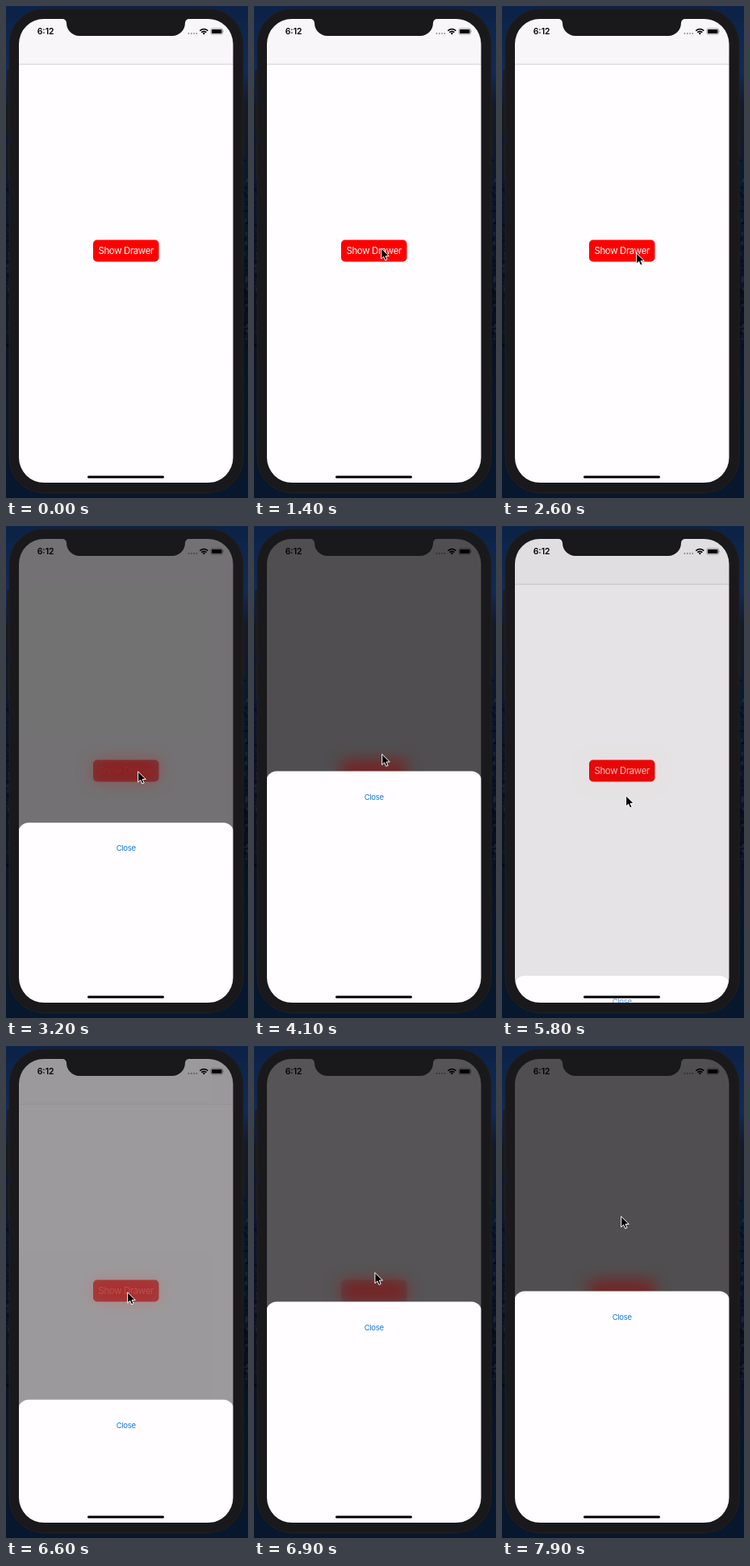
Recreate the animation shown at these times as an HTML page. Size 300 by 609 pixels, loop 8000 ms.

```html
<!DOCTYPE html>
<html lang="en">
<head>
<meta charset="utf-8">
<title>Drawer</title>
<style>
  html, body { margin: 0; width: 100%; height: 100%; overflow: hidden; background: #0b1c36; }
  svg { display: block; width: 300px; height: 609px; }
  text { font-family: Inter, "Open Sans", sans-serif; }
  .label { text-anchor: middle; }
</style>
</head>
<body>
<svg viewBox="0 0 300 609">
  <defs>
    <linearGradient id="sky" x2="0" y2="1">
      <stop offset="0" stop-color="#0c2246"/>
      <stop offset=".13" stop-color="#102a58"/>
      <stop offset=".2" stop-color="#141a28"/>
      <stop offset=".36" stop-color="#0b1830"/>
      <stop offset=".62" stop-color="#0a1120"/>
      <stop offset="1" stop-color="#07182e"/>
    </linearGradient>
    <filter id="soft" x="-50%" y="-150%" width="200%" height="400%" color-interpolation-filters="sRGB">
      <feGaussianBlur stdDeviation="9"/>
    </filter>
    <clipPath id="screen"><rect x="15" y="15" width="267.500" height="576" rx="12"/></clipPath>
  </defs>

  <rect width="300" height="609" fill="url(#sky)"/>
  <g id="rocks"></g>
  <g fill="#1b1a1c">
    <rect x="1.500" y="79" width="5" height="24" rx="1"/>
    <rect x="1.500" y="121" width="5" height="37" rx="1"/>
    <rect x="1.500" y="170" width="5" height="37" rx="1"/>
    <rect x="291" y="121" width="5" height="64" rx="1"/>
  </g>

  <g clip-path="url(#screen)">
    <rect width="300" height="609" fill="#fffdff"/>
    <g class="detail">
      <rect width="300" height="72" fill="#f8f6f9"/>
      <rect y="71.700" width="300" height=".8" fill="#c6c4c8"/>
    </g>
    <g id="button">
      <rect x="108" y="289.500" width="81.500" height="27" rx="5" fill="#f00"/>
      <text class="label detail" x="148.700" y="307.200" font-size="11.500" letter-spacing="-.4" fill="#fff">Show Drawer</text>
    </g>
    <g id="shade">
      <rect width="300" height="609" fill="#504e50"/>
      <rect x="108" y="289.500" width="81.500" height="27" rx="5" fill="#722526" filter="url(#soft)"/>
    </g>
    <g id="drawer">
      <rect x="15" width="267.500" height="320" rx="13" fill="#fffdff"/>
      <text id="close" class="label" x="148.700" y="35.300" font-size="9.600" letter-spacing="-.35" fill="#1478e0">Close</text>
    </g>
    <rect x="101" y="581.500" width="95" height="3" rx="1.500" fill="#000"/>
    <text x="38.700" y="35.200" font-size="10.400" font-weight="600" fill="#000">6:12</text>
    <path d="M226.500 34H238" stroke="#000" opacity=".42" stroke-width="1.800" stroke-linecap="round" stroke-dasharray="0 3.300"/>
    <g fill="none" stroke="#000" stroke-width="1.600">
      <path d="M240.300 30.700Q245.300 26.300 250.300 30.700M242.200 32.700Q245.300 30.100 248.400 32.700"/>
      <path d="M243.600 33.600L245.300 35.400L247 33.600Q245.300 32.400 243.600 33.600Z" fill="#000" stroke="none"/>
    </g>
    <rect x="253.900" y="27.900" width="14.700" height="7.200" rx="2" fill="none" stroke="#000" stroke-opacity=".5" stroke-width=".7"/>
    <rect x="255" y="29" width="12.500" height="5" rx="1" fill="#000"/>
    <path d="M269.500 30.300Q270.800 31.500 269.500 32.700Z" fill="#000" opacity=".5"/>
  </g>

  <!-- Bezel ring with the screen and notch cut out -->
  <path fill="#19181a" fill-rule="evenodd" d="
    M47 3.500H251A43 43 0 0 1 294 46.500V559.500A43 43 0 0 1 251 602.500H47A43 43 0 0 1 4 559.500V46.500A43 43 0 0 1 47 3.500Z
    M47 16H70A5 5 0 0 1 75 21A16 16 0 0 0 91 37H206A16 16 0 0 0 222 21A5 5 0 0 1 227 16H250.500
    A31 31 0 0 1 281.500 47V559A31 31 0 0 1 250.500 590H47A31 31 0 0 1 16 559V47A31 31 0 0 1 47 16Z"/>
  <rect x="4" y="3.500" width="290" height="599" rx="43" fill="none" stroke="#222123"/>

  <path id="cursor" d="M0 0V13.200L3 10.400L5 15L7.400 14L5.400 9.600H9.600Z" fill="#000" stroke="#fff" stroke-linejoin="round"/>
</svg>
<script>
  const LOOP = 8000, STEP = 100, OPEN_TOP = 303.5, CLOSED_TOP = 590, MOVE = 600;
  const el = id => document.getElementById(id);
  const fade = (node, value) => node.setAttribute("opacity", value);

  // Seeded speckle for the rocky wallpaper on both sides of the phone
  let seed = 7;
  const random = () => (seed = seed * 16807 % 2147483647) / 2147483647;
  for (let i = 0; i < 90; i++) {
    const x = random() < .5 ? 0 : 294, y = 190 + random() * 230;
    el("rocks").innerHTML += `<rect x="${x + random() * 4}" y="${y}" width="3" height="${1 + random() * 4}"
      fill="${random() < .6 ? "#05080f" : "#222938"}" opacity=".6"/>`;
  }

  const ramp = (t, start, length) => Math.min(1, Math.max(0, (t - start) / length));
  const ease = f => f * f * (3 - 2 * f);

  // Critically damped spring from 0 to 1
  function spring(ms, rate) {
    const x = Math.max(0, ms) * rate / 1000;
    return 1 - (1 + x) * Math.exp(-x);
  }

  function openness(t) {
    if (t < 5600) return spring(t - 2923, 10.3);
    if (t < 6600) return 1 - spring(t - 5600, 18.5);
    return spring(t - 6427, 10.3);
  }

  // Opacity of a control that dims on touch and recovers on release
  const pressed = (t, at) => 1 - .8 * ramp(t, at, 100) * (1 - ramp(t, at + 150, 250));

  // Cursor moves: start time and destination
  const moves = [
    [600, 157, 299], [1900, 166, 305], [2600, 163, 303],
    [3800, 153, 260], [4900, 153, 333], [5800, 150, 304], [6700, 147, 210]
  ];
  const cursorAt = t => moves.reduce(([x, y], [start, toX, toY]) => {
    const f = ease(ramp(t, start, MOVE));
    return [x + (toX - x) * f, y + (toY - y) * f];
  }, [43, 3]);

  function draw() {
    const now = performance.now() % LOOP;
    const t = Math.floor((now + 20) / STEP) * STEP % LOOP;
    const p = openness(t), shade = Math.pow(p, .9);
    const [x, y] = cursorAt(t);
    fade(el("shade"), shade);
    document.querySelectorAll(".detail").forEach(node => fade(node, 1 - shade));
    fade(el("button"), pressed(t, 2700) * pressed(t, 6270));
    fade(el("close"), pressed(t, 5480));
    el("drawer").setAttribute("transform", `translate(0 ${CLOSED_TOP + (OPEN_TOP - CLOSED_TOP) * p})`);
    el("cursor").setAttribute("transform", `translate(${x + .7} ${y + .9})`);
    el("cursor").setAttribute("visibility", t < 600 ? "hidden" : "visible");
    requestAnimationFrame(draw);
  }
  draw();
</script>
</body>
</html>
```
